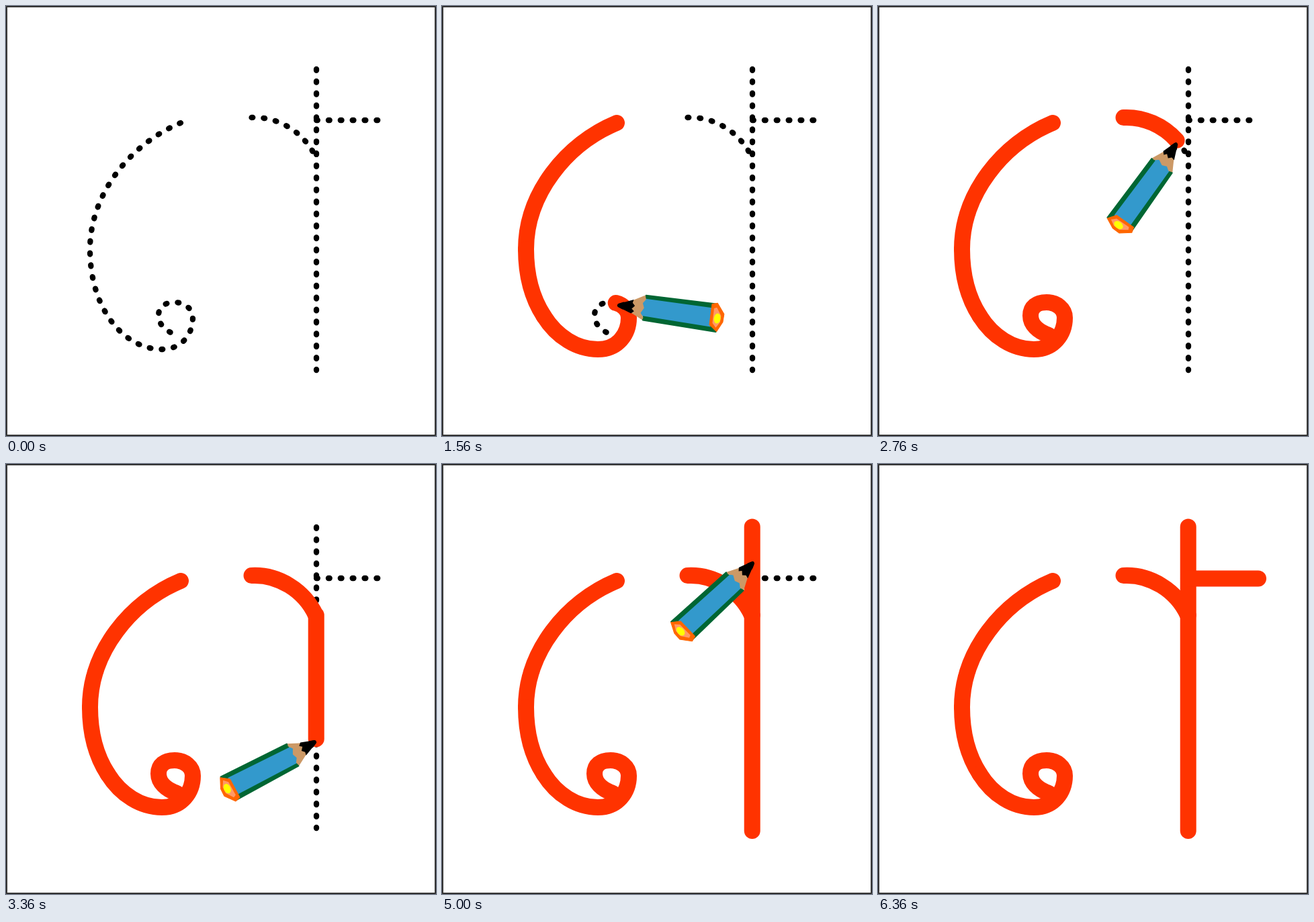
An HTML page that plays this animation: 640 by 640 pixels, repeating every 6520 ms.

```html
<!DOCTYPE html>
<html lang="en">
<head>
<meta charset="utf-8">
<title>Letter tracing</title>
<style>
  html, body { margin: 0; height: 100%; overflow: hidden; background: #fff; }
  svg { display: block; width: 100vw; height: 100vh; }
  #dots path { stroke: #000; stroke-width: 8.3; stroke-dasharray: 1.8 16.08; }
  #ink path { stroke: #f30; stroke-width: 24; }
  #dots, #ink { fill: none; stroke-linecap: round; }
</style>
</head>
<body>
<svg viewBox="0 0 640 640">
  <g id="dots"></g>
  <g id="ink"></g>
  <g id="pencil" stroke-linejoin="round">
    <path fill="#063" stroke="#063" stroke-width="2" d="M41-21 146-25 152 16 42 16Z"/>
    <path fill="#39c" d="M36-16 141-18.500 143 10 36 10Z"/>
    <path fill="#c96" d="M5 0 40-21 42-15 38-9 41-2 37 6 42 12 41 16Z"/>
    <path stroke="#000" stroke-width="6" d="M4 0 10-3 10 2Z"/>
    <path d="M4-3 24-12 23-7 27-3 23 2 27 5 23 9 4 3Z"/>
    <path fill="#f60" stroke="#f60" d="M140-24 148-26.500 160-12 160 0 153 15.500 141 7Z"/>
    <path fill="#f96" d="M144-18 148-20 156-9 156 1 151 10 145 4Z"/>
    <ellipse fill="#ff0" cx="151" cy="-4" rx="5" ry="7.500"/>
  </g>
  <rect x="1" y="1" width="638" height="638" fill="none" stroke="#333" stroke-width="2"/>
</svg>
<script>
const STEP = 40, STEPS = 163;
const $ = id => document.getElementById(id);

const side = 'M260 174C185 205 125 280 125 362';
const turn = 'C125 402 135 436 151.400 461.300';
const loop = 'C171 492.500 201 511 232 511C262 511 278 488 278 464' +
  'C278 451 266 441 251 441C236 441 227 448 227 461C227 474 238 484 254 490';
const arc = 'M365.500 166C405 164 444 188 461 225';

function addPath(parent, d) {
  const path = document.createElementNS('http://www.w3.org/2000/svg', 'path');
  path.setAttribute('d', d);
  return parent.appendChild(path);
}

[side + turn + loop, arc, 'M462 94V542', 'M462 170H556'].forEach(d => addPath($('dots'), d));

// Each leg: path, step and pencil angle at its end, whether it leaves ink
let step = 1, angle = 52;
const legs = [
  [side, 18, 43, true],
  ['M125 362' + turn, 25.2, 0, true],
  ['M151.400 461.300' + loop, 44.8, 13, true],
  ['M252 488L361 162', 61.3, 106, false],
  [arc, 71.6, 134, true],
  ['M461.700 225V546', 93.2, 168, true],
  ['M461.700 546V225', 104.8, 168, false],
  ['M461.700 225V93.500', 115.5, 142, true],
  ['M464 93.500V170', 130.4, 136, false],
  ['M462 170.500H566', 151, 84, true]
].map(([d, to, endAngle, draws]) => {
  const path = addPath($('ink'), d);
  const leg = { path, from: step, to, angle, turn: endAngle - angle, draws, length: path.getTotalLength() };
  step = to;
  angle = endAngle;
  return leg;
});

const progress = (n, from, to) => Math.min(1, Math.max(0, (n - from) / (to - from)));

function draw(n) {
  for (const leg of legs) {
    const begun = n >= leg.from, k = progress(n, leg.from, leg.to), done = leg.length * k;
    leg.path.style.display = leg.draws && begun ? '' : 'none';
    leg.path.style.strokeDasharray = k < 1 ? `${Math.max(done, 0.01)} 9999` : 'none';
    if (begun) {
      const { x, y } = leg.path.getPointAtLength(done);
      $('pencil').setAttribute('transform', `translate(${x + 1} ${y + 3}) rotate(${leg.angle + leg.turn * k})`);
    }
  }
  $('pencil').style.opacity = n < 1 ? 0 : progress(n, 159, 153);
}

function tick() {
  draw(Math.floor(performance.now() / STEP) % STEPS);
  requestAnimationFrame(tick);
}
tick();
</script>
</body>
</html>
```
